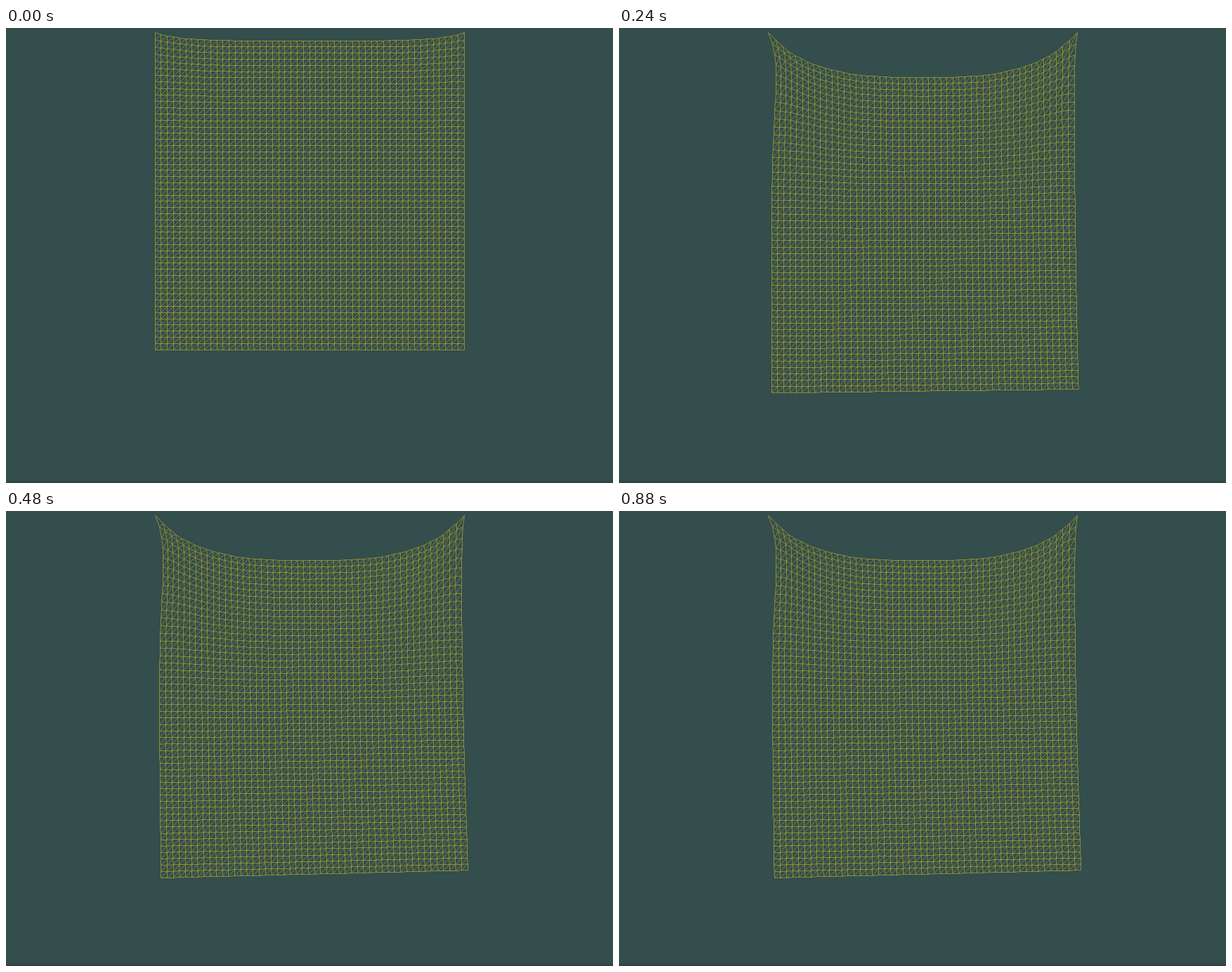
Animation, 864 px wide and 648 px high, one loop 0.96 s. Source, as an HTML page:

```html
<!DOCTYPE html>
<html lang="en">
<head>
<meta charset="utf-8">
<title>Hanging cloth</title>
<style>
  html, body { margin: 0; width: 100%; height: 100%; overflow: hidden; background: #344d4d; }
  svg { display: block; width: 864px; height: 648px; }
  path { fill: none; stroke: #8c8e31; }
</style>
</head>
<body>
<svg viewBox="0 0 864 648">
  <rect width="864" height="648" fill="#344d4d"/>
  <rect y="645" width="864" height="3" fill="#2e4445"/>
  <path id="diagonals" stroke-width="0.85"/>
  <path id="grid" stroke-width="1"/>
</svg>
<script>
const CELLS = 50, SIZE = 440, LEFT = 212, TOP = 6;
const STEP = 80, STEPS = 12;
const FALL = [12, 33, 49.5, 64.3]; // sag of the top edge until it pulls tight

const mix = (a, b, t) => a + (b - a) * t;
const clamp = n => Math.min(1, Math.max(0, n));
const smooth = t => t * t * (3 - 2 * t);
const snap = n => Math.floor(n + 0.1) + 0.5;

function poseAt(step) {
  const last = FALL.length - 1;
  const sag = FALL[Math.min(step, last)];
  const tight = (sag - FALL[0]) / (FALL[last] - FALL[0]);
  const swing = smooth(clamp((step - 1) / 4));
  return {
    sag,
    reach: 1 + 0.55 * (1 - tight) ** 3,
    narrow: 4.5 * tight ** 3,
    pinch: 7.5 * tight,
    stretch: 6.7 * tight ** 2,
    tilt: 5.4 * swing,
    sway: 6.8 * swing + 0.06 * step
  };
}

// How strongly the nearest pinned corner holds a point up
function hold(r) {
  const s = Math.max(0, 1 - 2 * r);
  return 0.75 * s ** 3 + 0.25 * s ** 10;
}

function node(u, v, pose) {
  const side = 1 - 2 * u;
  const r = Math.hypot(Math.min(u, 1 - u), 0.7 * v);
  const free = 1 - Math.exp(-r / 0.03);
  const neck = v / 0.075 * Math.exp(1 - v / 0.075);

  const dx = pose.narrow * side * (1 - 0.65 * v * v) * free
    + pose.sway * mix(Math.sqrt(v), v * v, 0.75)
    + pose.pinch * neck * Math.exp(-u / 0.07);
  const give = v * (1 - 0.5 * Math.exp(-((v / 0.35) ** 2)));
  const dy = pose.sag * (1 - hold(r * pose.reach))
    + (pose.stretch + pose.tilt * side) * give;

  return snap(LEFT + SIZE * u + dx) + " " + snap(TOP + SIZE * v + dy);
}

const grid = document.getElementById("grid");
const diagonals = document.getElementById("diagonals");
const line = points => "M" + points.join("L");

function draw(step) {
  const pose = poseAt(step);
  const rows = Array.from({ length: CELLS + 1 }, (_, j) =>
    Array.from({ length: CELLS + 1 }, (_, i) => node(i / CELLS, j / CELLS, pose)));
  const across = rows.map(line);
  const down = rows[0].map((_, i) => line(rows.map(row => row[i])));
  grid.setAttribute("d", across.concat(down).join(""));

  let d = "";
  for (let j = 0; j < CELLS; j++)
    for (let i = 0; i < CELLS; i++)
      d += line([rows[j][i + 1], rows[j + 1][i]]);
  diagonals.setAttribute("d", d);
}

let shown = -1;
const start = performance.now();
function tick() {
  const step = Math.floor((performance.now() - start) / STEP) % STEPS;
  if (step !== shown) draw(shown = step);
  requestAnimationFrame(tick);
}
tick();
</script>
</body>
</html>
```
